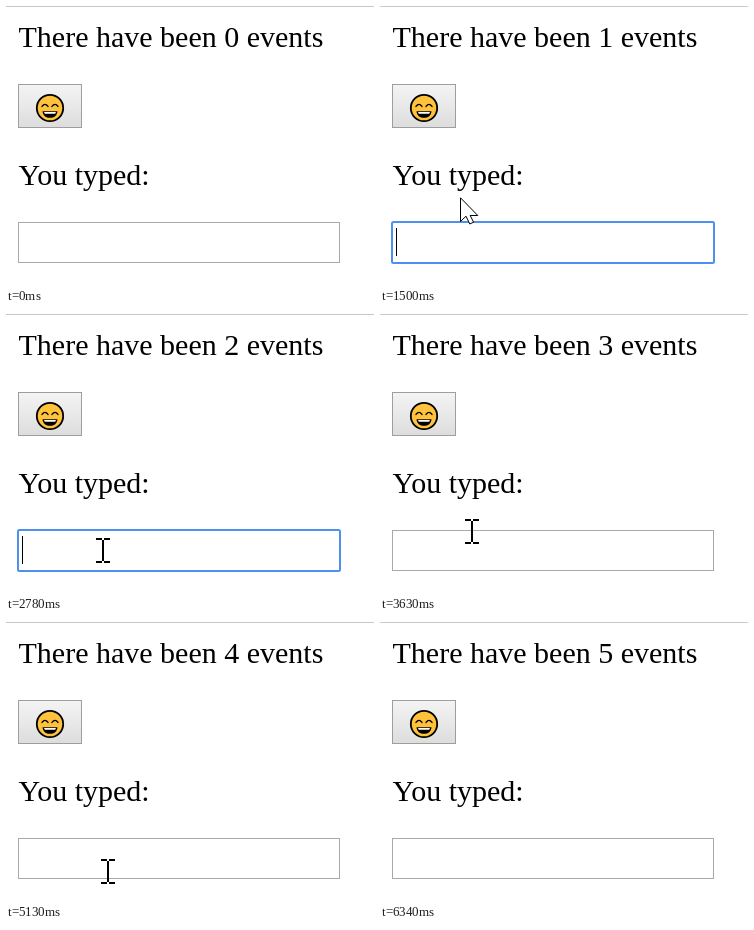
Recreate the animation shown at these times as an HTML page. Size 368 by 280 pixels, loop 6.79 s.

```html
<!DOCTYPE html>
<html lang="en">
<head>
<meta charset="utf-8">
<title>Event counter</title>
<style>
  html, body { margin: 0; width: 100%; height: 100%; overflow: hidden; background: #fff; }
  svg { display: block; }
  text { font: 30px "Liberation Serif", "Times New Roman", serif; fill: #000; }
  #button { fill: url(#face); stroke: #9e9e9e; }
  #button.hover { stroke: #7c7c7c; }
  #button.active { fill: #dcdcdc; stroke: #7c7c7c; }
  .line { fill: none; stroke: #000; }
</style>
</head>
<body>
<svg width="368" height="280" viewBox="0 0 368 280">
  <defs>
    <linearGradient id="face" x2="0" y2="1">
      <stop offset="0" stop-color="#f4f4f4"/>
      <stop offset="1" stop-color="#dddddd"/>
    </linearGradient>
  </defs>

  <rect width="368" height="1" fill="#c8c8c8"/>
  <text x="12.5" y="41">There have been <tspan id="count">0</tspan> events</text>
  <text x="12.5" y="179">You typed:</text>

  <rect id="button" x="12.5" y="78.5" width="63" height="43"/>
  <g transform="translate(44 102)">
    <circle r="13.2" fill="#ffc23d" stroke="#000" stroke-width="1.8"/>
    <path class="line" stroke-width="1.4" stroke-linecap="round"
      d="M-8 -1.6Q-5 -5.6 -2 -1.6M2 -1.6Q5 -5.6 8 -1.6"/>
    <path d="M-7.5 3.2H7.5C7.2 7.5 4 9.8 0 9.8S-7.2 7.5 -7.5 3.2Z"/>
    <path d="M-6 4H6L5.2 5.8H-5.2Z" fill="#fff"/>
  </g>

  <rect x="12.5" y="216.5" width="321" height="40" fill="#fff" stroke="#a9a9a9"/>
  <rect id="ring" x="12" y="216" width="322" height="41" rx="1.5" fill="none" stroke="#4d90f0" stroke-width="2"/>
  <rect id="caret" x="16" y="222" width="1" height="28"/>

  <g id="pointer">
    <path id="arrow" fill="#fff" stroke="#000"
      d="M.5 .8V24.5L6 19.2L9.8 27L13.6 25.2L10.2 18.5H17.8Z"/>
    <path id="beam" class="line" stroke-width="2" d="M-7 -11H-1M1 -11H7M0 -10V11M-7 12H-1M1 12H7"/>
  </g>
</svg>
<script>
const LOOP = 6790, ENTER = 50, LEAVE = 6340;
const ROUND = 1395;

// Each round starts when the pointer leaves the field for the button.
const rounds = [0, 1, 2, 3].map(k => 1385 + k * ROUND);
const buttonClicks = [560, ...rounds.map(t => t + 330)];
const fieldClicks = rounds.map(t => t - 200);

const stop = (t, x, y) => ({ t, x, y });
const stops = [
  stop(ENTER, 230, 264), stop(500, 47, 101), stop(830, 47, 101), stop(1180, 102, 249),
  ...rounds.flatMap(t => [
    stop(t, 97, 236), stop(t + 300, 47, 101), stop(t + 606, 54, 101), stop(t + 955, 102, 249)
  ]).slice(0, -2),
  stop(5960, 54, 101), stop(6400, 296, 300)
];

const $ = id => document.getElementById(id);
const show = (id, on) => { $(id).style.display = on ? "" : "none"; };
const lastBefore = (times, t) => times.filter(c => c <= t).pop() ?? -Infinity;
const ease = u => u * u * (3 - 2 * u);

function pointerAt(t) {
  const next = Math.max(1, stops.findIndex(s => s.t > t));
  const a = stops[next - 1], b = stops[next];
  const u = ease(Math.min(1, Math.max(0, (t - a.t) / (b.t - a.t))));
  return { x: Math.round(a.x + (b.x - a.x) * u), y: Math.round(a.y + (b.y - a.y) * u) };
}

function draw(t) {
  const present = t >= ENTER && t < LEAVE;
  const { x, y } = pointerAt(t);
  const within = (l, top, r, b) => x >= l && x < r && y >= top && y < b;
  const pressed = lastBefore(buttonClicks, t);
  const focused = lastBefore(fieldClicks, t);
  const hasFocus = focused > pressed;
  const hover = present && within(12, 78, 76, 122);
  const overText = within(12, 216, 334, 257) || within(12, 152, 143, 186);

  $("count").textContent = buttonClicks.filter(c => c <= t).length;
  $("button").setAttribute("class", !hover ? "" : t - pressed < 80 ? "active" : "hover");
  show("ring", hasFocus);
  show("caret", hasFocus && (t - focused) % 1000 < 500);
  show("pointer", present);
  show("beam", overText);
  show("arrow", !overText);
  $("pointer").setAttribute("transform", `translate(${x} ${y})`);
}

const start = performance.now();
function tick() {
  draw((performance.now() - start) % LOOP);
  requestAnimationFrame(tick);
}
tick();
</script>
</body>
</html>
```
